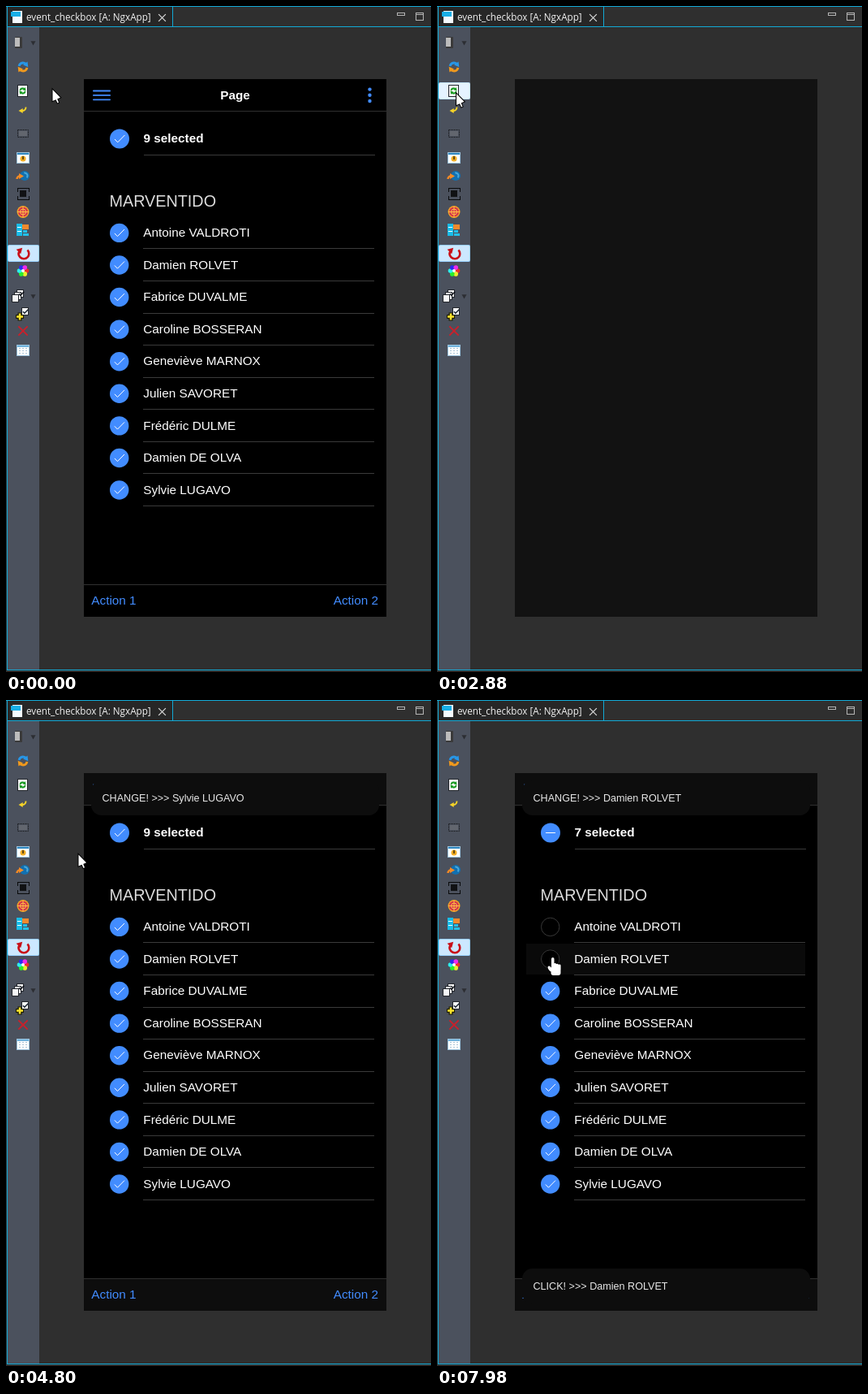
Recreate the animation shown at these times as an HTML page with a canvas. Size 524x820 px, loop 8 s.

```html
<!DOCTYPE html>
<html lang="en">
<head>
<meta charset="utf-8">
<title>Checkbox events</title>
<style>
  html, body { margin: 0; width: 100%; height: 100%; overflow: hidden; background: #2f2f2f; }
  canvas { display: block; width: 524px; height: 820px; }
</style>
</head>
<body>
<canvas id="stage" width="524" height="820"></canvas>
<script>
const ctx = document.getElementById('stage').getContext('2d');
const LOOP = 8000, STEP = 60, ROW = 39.58;
const BLUE = '#428cff', EDGE = '#12a9d6', BAR = '#0d0d0d', RULE = '#3a3a3a';
const APP_FONT = '"Liberation Sans", Arial, sans-serif';
const UI_FONT = '11.7px "Open Sans", "Noto Sans", sans-serif';
const PEOPLE = ['Antoine VALDROTI', 'Damien ROLVET', 'Fabrice DUVALME', 'Caroline BOSSERAN',
  'Geneviève MARNOX', 'Julien SAVORET', 'Frédéric DULME', 'Damien DE OLVA', 'Sylvie LUGAVO'];

const RELOAD = 2880, READY = 3000, COUNTED = 3660, HAND = 5280;
const HOLD = 180; // from press to reaction
const PRESS = { refresh: 1980, first: 5880, second: 7320 };
const UNCHECKED = [PRESS.first + HOLD, PRESS.second + HOLD];
const TOASTS = [
  { who: 8, from: READY, to: 4860, click: false },
  { who: 0, from: UNCHECKED[0] - STEP, to: 7620, click: true },
  { who: 1, from: UNCHECKED[1] - STEP, to: LOOP, click: true }
];

const clamp = v => Math.max(0, Math.min(1, v));
const progress = (t, from, to) => clamp((t - from) / (to - from));
const smooth = p => p * p * (3 - 2 * p);
const easeOut = p => 1 - (1 - p) ** 4;
const turn = Math.PI * 2;

function box(x, y, w, h, color) {
  ctx.fillStyle = color;
  ctx.fillRect(x, y, w, h);
}

function frame(x, y, w, h, color) {
  ctx.strokeStyle = color;
  ctx.lineWidth = 1;
  ctx.strokeRect(x + 0.5, y + 0.5, w - 1, h - 1);
}

function rounded(x, y, w, h, r, color) {
  ctx.beginPath();
  ctx.roundRect(x, y, w, h, r);
  ctx.fillStyle = color;
  ctx.fill();
}

function disc(x, y, r, color) {
  ctx.beginPath();
  ctx.arc(x, y, r, 0, turn);
  ctx.fillStyle = color;
  ctx.fill();
}

function arc(x, y, r, color, width = 1, from = 0, to = turn) {
  ctx.beginPath();
  ctx.arc(x, y, r, from, to);
  ctx.strokeStyle = color;
  ctx.lineWidth = width;
  ctx.stroke();
}

function triangle(x, y, r, angle, color) {
  ctx.beginPath();
  for (let i = 0; i < 3; i++) {
    const a = angle + i * turn / 3;
    ctx.lineTo(x + r * Math.cos(a), y + r * Math.sin(a));
  }
  ctx.fillStyle = color;
  ctx.fill();
}

// Two crossing strokes: a plus, or an X when turned by an eighth
function cross(x, y, r, color, width, angle = turn / 8) {
  ctx.beginPath();
  for (const a of [angle, angle + turn / 4]) {
    const dx = r * Math.cos(a), dy = r * Math.sin(a);
    ctx.moveTo(x - dx, y - dy);
    ctx.lineTo(x + dx, y + dy);
  }
  ctx.strokeStyle = color;
  ctx.lineWidth = width;
  ctx.stroke();
}

function tick(x, y, r, color, width = 1) {
  ctx.beginPath();
  ctx.moveTo(x - r * 0.5, y + r * 0.04);
  ctx.lineTo(x - r * 0.19, y + r * 0.36);
  ctx.lineTo(x + r * 0.54, y - r * 0.38);
  ctx.strokeStyle = color;
  ctx.lineWidth = width;
  ctx.stroke();
}

function text(str, x, y, font, color, align = 'left') {
  ctx.font = font;
  ctx.fillStyle = color;
  ctx.textAlign = align;
  ctx.fillText(str, x, y);
}

const appText = (str, x, y, color = '#fff', size = 15.3, weight = 'normal', align = 'left') =>
  text(str, x, y, `${weight} ${size}px ${APP_FONT}`, color, align);

function plate(y, fill, edge) {
  rounded(2, y, 39, 21, 2, edge);
  rounded(3, y + 1, 37, 19, 1, fill);
}

function sheet(x, y, w = 7, h = 8) {
  box(x - 1, y - 1, w + 2, h + 2, '#23262c');
  box(x, y, w, h, '#f6f7f8');
}

function panelIcon(y, top) {
  box(13, y - 7, 16, 14, '#9cc3dd');
  box(14, y - 6, 14, 12, '#fdfefe');
  box(14, y - 6, 14, 2, top);
}

function swirl(x, y, r, colors, width) {
  colors.forEach((color, i) => {
    const end = i * turn / 2 + 2.5;
    arc(x, y, r, color, width, end - 2.3, end);
    triangle(x + r * Math.cos(end), y + r * Math.sin(end), width * 1.3, end + turn / 4, color);
  });
}

function drawToolbar(hover) {
  box(2, 26, 39, 791, '#4b515d');
  if (hover) plate(94, '#e5f3ff', '#c4e4fb');
  plate(294, '#cce8ff', '#99d1ff');
  for (const y of [45, 357]) triangle(33.5, y, 3.5, turn / 4, '#2c2e33');

  rounded(11, 38, 9, 14, 1, '#3a3a3a');
  box(11, 39, 6, 11, '#bcbcbc');

  swirl(21, 75, 5, ['#f29a1d', '#2797e8'], 3);

  sheet(15, 98, 11, 13);
  swirl(20.5, 104.5, 3, ['#159b20', '#159b20'], 2);

  arc(20, 124.5, 4.5, '#f5d328', 2, 0, turn / 4);
  triangle(19, 129, 3.5, turn / 2, '#f5d328');

  ctx.setLineDash([2, 1]);
  frame(14, 152, 14, 10, '#202226');
  ctx.setLineDash([]);
  box(16, 154, 10, 6, '#62666e');

  panelIcon(187, '#2f87c0');
  disc(21, 188, 3.5, '#f0ad24');
  box(20, 185, 2, 4, '#684a10');

  disc(23, 209, 6, '#1270b0');
  arc(23, 209, 3.5, '#48a8dc', 2, 4.5, 7);
  arc(17, 213, 3.5, '#f58a25', 2.5, turn / 2, turn * 0.75);
  triangle(18, 209.5, 4, 0, '#f58a25');

  frame(14, 224, 15, 15, '#090a0b');
  box(13, 229, 17, 5, '#4b515d');
  box(17, 227, 8, 8, '#111214');

  disc(21, 253.5, 7.5, '#f3a326');
  disc(21, 253.5, 6, '#d4344c');
  cross(21, 253.5, 7, '#ffc247', 1, 0);
  arc(21, 253.5, 3.5, '#ffc247');

  box(13, 268, 7, 15, '#18bce8');
  box(20, 269, 8, 6, '#f08a2d');
  for (let i = 0; i < 2; i++) {
    box(14, 272 + i * 5, 5, 1, '#fff');
    box(21, 276 + i * 4, 5 + i * 2, 3, '#22c1ea');
  }

  arc(22, 305, 6.3, '#c80f18', 2.6, -0.8, 3.7);
  triangle(17, 301, 4.5, -turn / 8, '#c80f18');

  for (let i = 0; i < 6; i++) {
    const a = i * turn / 6;
    disc(21 + 4.5 * Math.cos(a), 326 + 4.5 * Math.sin(a), 2.8, `hsl(${i * 60}, 85%, 55%)`);
  }
  disc(21, 326, 2, '#fff');

  for (let i = 0; i < 3; i++) sheet(14 - i * 3, 350 + i * 3);
  tick(19, 354, 6, '#10131a', 1.5);

  sheet(20, 372);
  tick(24, 376, 6, '#17202e', 1.5);
  cross(17, 382.5, 5, '#1b1b00', 5, 0);
  cross(17, 382.5, 4, '#ffe52e', 2.5, 0);

  cross(21, 400, 8, '#c9202b', 2);

  panelIcon(424, '#6fb2dc');
  for (let i = 0; i < 9; i++) box(16 + (i % 3) * 4, 421 + Math.floor(i / 3) * 3, 2, 1, '#a9c4d6');
}

function drawWindow(hover) {
  box(0, 0, 524, 820, '#2f2f2f');
  box(1, 1, 204, 24, '#272727');
  box(0, 0, 524, 1, EDGE);
  box(205, 1, 1, 25, EDGE);
  box(1, 25, 523, 1, EDGE);
  box(1, 1, 1, 817, EDGE);
  box(1, 817, 523, 1, EDGE);

  box(8, 6, 12, 15, '#f5fbff');
  box(6, 7, 12, 6, '#18aee6');
  text('event_checkbox [A: NgxApp]', 25, 18, UI_FONT, '#f2f2f2');
  cross(192.5, 14.5, 6.2, '#dcdcdc', 1.2);
  frame(482, 8, 10, 4, '#b5b5b5');
  frame(505, 8, 10, 10, '#b5b5b5');
  box(505, 10, 10, 1, '#b5b5b5');

  drawToolbar(hover);
}

function drawCheckbox(x, y, r, state) {
  disc(x, y, r, state === 'off' ? '#000' : BLUE);
  if (state === 'off') arc(x, y, r - 0.5, '#383838');
  if (state === 'on') tick(x, y, r, '#fff');
  if (state === 'mixed') box(x - r / 2, Math.round(y) - 1, r, 1, '#fff');
}

function drawBars(color) {
  box(96, 90, 373, 39, color);
  box(96, 129, 373, 1, '#303030');
  box(96, 712, 373, 40, color);
  box(96, 712, 373, 1, '#303030');
  for (let i = -1; i < 2; i++) {
    rounded(107, 109 + i * 5.4, 22, 1.8, 0.9, BLUE);
    disc(448.5, 109.8 + i * 7.2, 2.2, BLUE);
  }
  appText('Page', 282.5, 115, '#fff', 15.3, 'bold', 'center');
  appText('Action 1', 105.3, 737, BLUE);
  appText('Action 2', 459, 737, BLUE, 15.3, 'normal', 'right');
}

function drawToast(t, { who, from, to, click }) {
  const shown = easeOut(progress(t, from, from + 400)) - easeOut(progress(t, to, to + 300));
  if (shown <= 0) return;
  const shift = (1 - shown) * 53;
  const panel = (y, label) => {
    rounded(105, y, 355, 43, 12.6, BAR);
    appText(`${label}! >>> ${PEOPLE[who]}`, 118.5, y + 26, '#e8e8e8', 12.6);
  };
  panel(99 - shift, 'CHANGE');
  if (click) panel(700 + shift, 'CLICK');
}

function drawPage(t, pointer) {
  if (t >= RELOAD && t < READY) return box(96, 90, 373, 662, '#121212');
  ctx.save();
  ctx.beginPath();
  ctx.rect(96, 90, 373, 662);
  ctx.clip();
  box(96, 90, 373, 662, '#000');
  drawBars(t < RELOAD ? '#000' : BAR);

  const removed = UNCHECKED.filter(at => t >= at).length;
  const count = t >= READY && t < COUNTED ? 0 : PEOPLE.length - removed;
  drawCheckbox(140, 163.5, 12, removed ? 'mixed' : 'on');
  appText(`${count} selected`, 169.5, 168, '#fff', 15.3, 'bold');
  box(170, 183, 285, 1, RULE);
  appText('MARVENTIDO', 127.5, 247, '#dcdcdc', 19.8);

  const hovered = t < HAND ? -1 : Math.floor((pointer.y - 264) / ROW);
  PEOPLE.forEach((name, i) => {
    const y = i * ROW;
    const lineY = Math.round(298.4 + y);
    if (i === hovered) box(110, lineY - 38, 344, 38, '#0a0a0a');
    drawCheckbox(139.7, 279.4 + y, 11.7, t >= UNCHECKED[i] ? 'off' : 'on');
    appText(name, 169.3, Math.round(284.1 + y));
    box(169, lineY, 285, 1, RULE);
  });
  TOASTS.forEach(toast => drawToast(t, toast));
  ctx.restore();
}

function pointerAt(t) {
  const pos = { x: 57, y: 102 };
  const glide = (x, y, from, to) => {
    const p = smooth(progress(t, from, to));
    pos.x += (x - pos.x) * p;
    pos.y += (y - pos.y) * p;
  };
  glide(23.5, 107, 600, 1080);
  glide(131.5, 243, 4320, 5160);
  glide(138.5, 274, 5160, 5520);
  glide(142.5, 317, 6720, 7040);
  return pos;
}

function drawTooltip(t) {
  if (t >= PRESS.refresh) return;
  ctx.globalAlpha = progress(t, 1200, 1440);
  box(23, 126, 52, 20, '#fff');
  frame(23, 126, 52, 20, '#767676');
  text('Refresh', 49, 140, UI_FONT, '#575757', 'center');
  ctx.globalAlpha = 1;
}

function drawHalo(t, { x, y }) {
  for (const at of Object.values(PRESS)) {
    const fade = t < at ? 0 : 1 - progress(t, at + HOLD - STEP, at + HOLD + 240);
    disc(x - 0.5, y + 0.5, 12, `rgba(255, 255, 0, ${0.52 * fade})`);
  }
}

function handPath() {
  const hand = new Path2D();
  hand.roundRect(-1.5, 0, 3.5, 15, 1.7);
  for (let i = 0; i < 3; i++) hand.roundRect(1.5 + i * 2.8, 7 + i * 0.8, 3, 8, 1.4);
  hand.roundRect(-2, 12, 12, 10, 3);
  hand.ellipse(-3, 14, 2, 4, -0.6, 0, turn);
  return hand;
}

function arrowPath() {
  const arrow = new Path2D('M.5 1 V15 L10 10.7 Z');
  arrow.addPath(new Path2D('M3 10 L6.5 17.5 L8 16.8 L5 9.5 Z'));
  return arrow;
}

function drawPointer(t, { x, y }) {
  const outline = t >= HAND ? handPath() : arrowPath();
  ctx.save();
  ctx.translate(x, y);
  ctx.strokeStyle = '#000';
  ctx.lineWidth = 2;
  ctx.stroke(outline);
  ctx.fillStyle = '#fff';
  ctx.fill(outline);
  ctx.restore();
}

function draw(time) {
  const t = Math.floor((time % LOOP) / STEP) * STEP;
  const pointer = pointerAt(t);
  const hover = pointer.x < 41 && pointer.y > 94 && pointer.y < 115;
  drawWindow(hover);
  drawPage(t, pointer);
  drawTooltip(t);
  drawHalo(t, pointer);
  drawPointer(t, pointer);
}

const start = performance.now();
function tickFrame() {
  draw(performance.now() - start);
  requestAnimationFrame(tickFrame);
}
tickFrame();
</script>
</body>
</html>
```
